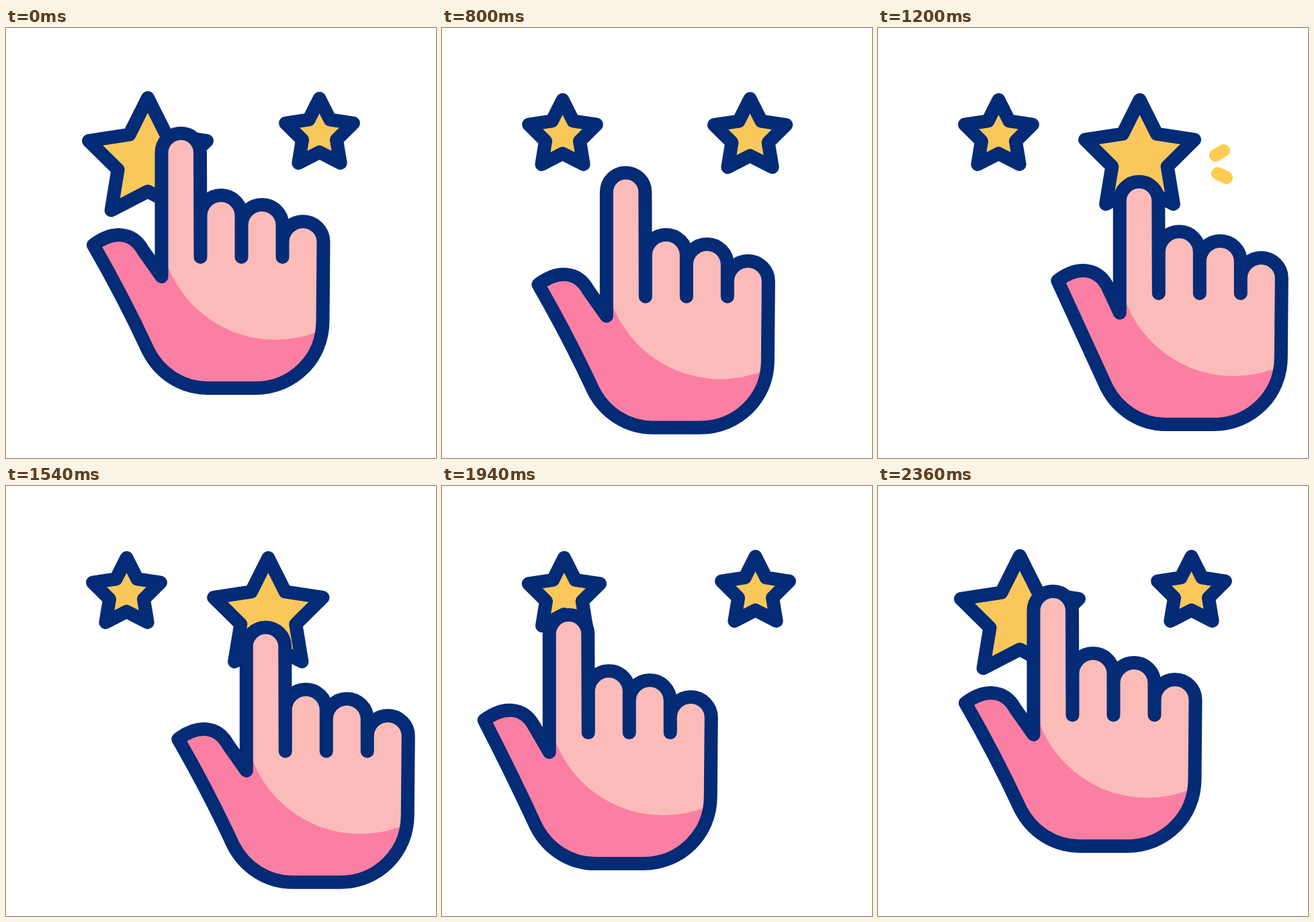
Animation of 640 by 640 pixels, one loop 2.4 s. Source, as an HTML page:

```html
<!DOCTYPE html>
<html lang="en">
<head>
<meta charset="utf-8">
<title>Hand and stars</title>
<style>
  html, body { margin: 0; width: 100%; height: 100%; overflow: hidden; background: #fff; }
  svg { display: block; width: 100vw; height: 100vh; }
  .line { stroke: #042b76; stroke-width: 20; stroke-linejoin: round; stroke-linecap: round; }
  .star { fill: #fac85a; }
  .spark { stroke: #ffcb52; stroke-width: 19; stroke-linecap: round; }
</style>
</head>
<body>
<svg viewBox="0 0 640 640">
  <defs><clipPath id="inside"><path class="outline"/></clipPath></defs>
  <path id="left" class="line star"/>
  <path id="right" class="line star"/>
  <path id="sparks" class="spark"/>
  <g id="hand">
    <g clip-path="url(#inside)">
      <rect x="100" y="140" width="400" height="410" fill="#fb7fa2"/>
      <path d="M232 140H480V292H232Z" fill="#fbbcb9"/>
      <circle cx="401" cy="292" r="172" fill="#fbbcb9"/>
    </g>
    <path class="outline line" fill="none"/>
  </g>
</svg>
<script>
const LOOP = 2400, STEP = 20;
const SMALL = 53;

const $ = id => document.getElementById(id);
const outlines = document.querySelectorAll('.outline');
const mix = (a, b, k) => a + (b - a) * k;

// Smooth 0 to 1 between two times.
function ease(t, from, to) {
  const s = Math.min(1, Math.max(0, (t - from) / (to - from)));
  return s * s * (3 - 2 * s);
}

function starPath(cx, top, r) {
  const points = Array.from({ length: 10 }, (_, i) => {
    const a = i * Math.PI / 5, q = i % 2 ? r * 0.505 : r;
    return [cx + q * Math.sin(a), top + r - q * Math.cos(a)];
  });
  return 'M' + points.join('L') + 'Z';
}

// A knuckle: up from the gap, over a half circle to the next gap.
const knuckle = (x, y) => `L${x} 341V${y}a30.5 30.5 0 0 1 61 0`;

// Pressing shortens the index finger and pulls the thumb inwards.
function handPath(p) {
  const tip = 185.5 + 18 * p;
  const thumb = (x, y) => `${x + 9 * p} ${y - p}`;
  return `M${thumb(130, 323)}C${thumb(158, 302)} ${thumb(188, 302)} ${thumb(204, 331)}` +
    `L231.5 370V${tip}a28.75 28.75 0 0 1 57.5 0` +
    knuckle(289.5, 279.5) + knuckle(350.5, 293.5) + knuckle(411.5, 318.5) +
    'L471.5 436C471.5 492 427 536 371 536' +
    `H300C262 536 229 514 212 481Q175 401 ${thumb(130, 323)}Z`;
}

function sparkPath(t) {
  const head = ease(t, 1120, 1200), tail = ease(t, 1220, 1320);
  if (head <= tail) return '';
  const bar = (x, y, dx, dy) =>
    `M${x + dx * tail} ${y + dy * tail}L${x + dx * head} ${y + dy * head}`;
  return bar(502.5, 189.5, 12, -7) + bar(505.5, 216.5, 13, 6);
}

function draw(t) {
  const down = ease(t, 200, 720);
  const reach = ease(t, 720, 1120);
  const back = ease(t, 1520, 1860);
  const rise = ease(t, 1860, 2340);

  const grownLeft = 1 - down + rise;
  const grownRight = reach - back;
  $('left').setAttribute('d',
    starPath(mix(179.5, 211, grownLeft), mix(107, 104, grownLeft), mix(SMALL, 92.5, grownLeft)));
  $('right').setAttribute('d',
    starPath(mix(466.5, 389.5, grownRight), mix(105, 107, grownRight), mix(SMALL, 85.7, grownRight)));

  const x = 128.3 * reach - 205.8 * back + 77.5 * rise;
  const y = 59.2 * down - 5.2 * reach - 25.8 * back - 28.2 * rise;
  $('hand').setAttribute('transform', `translate(${x} ${y})`);

  const press = ease(t, 1080, 1200) - ease(t, 1320, 1480) +
    ease(t, 1860, 2020) - ease(t, 2020, 2200);
  const d = handPath(press);
  outlines.forEach(el => el.setAttribute('d', d));
  $('sparks').setAttribute('d', sparkPath(t));
}

const start = performance.now();
function tick() {
  const t = (performance.now() - start) % LOOP;
  draw(Math.floor(t / STEP) * STEP);
  requestAnimationFrame(tick);
}
tick();
</script>
</body>
</html>
```
